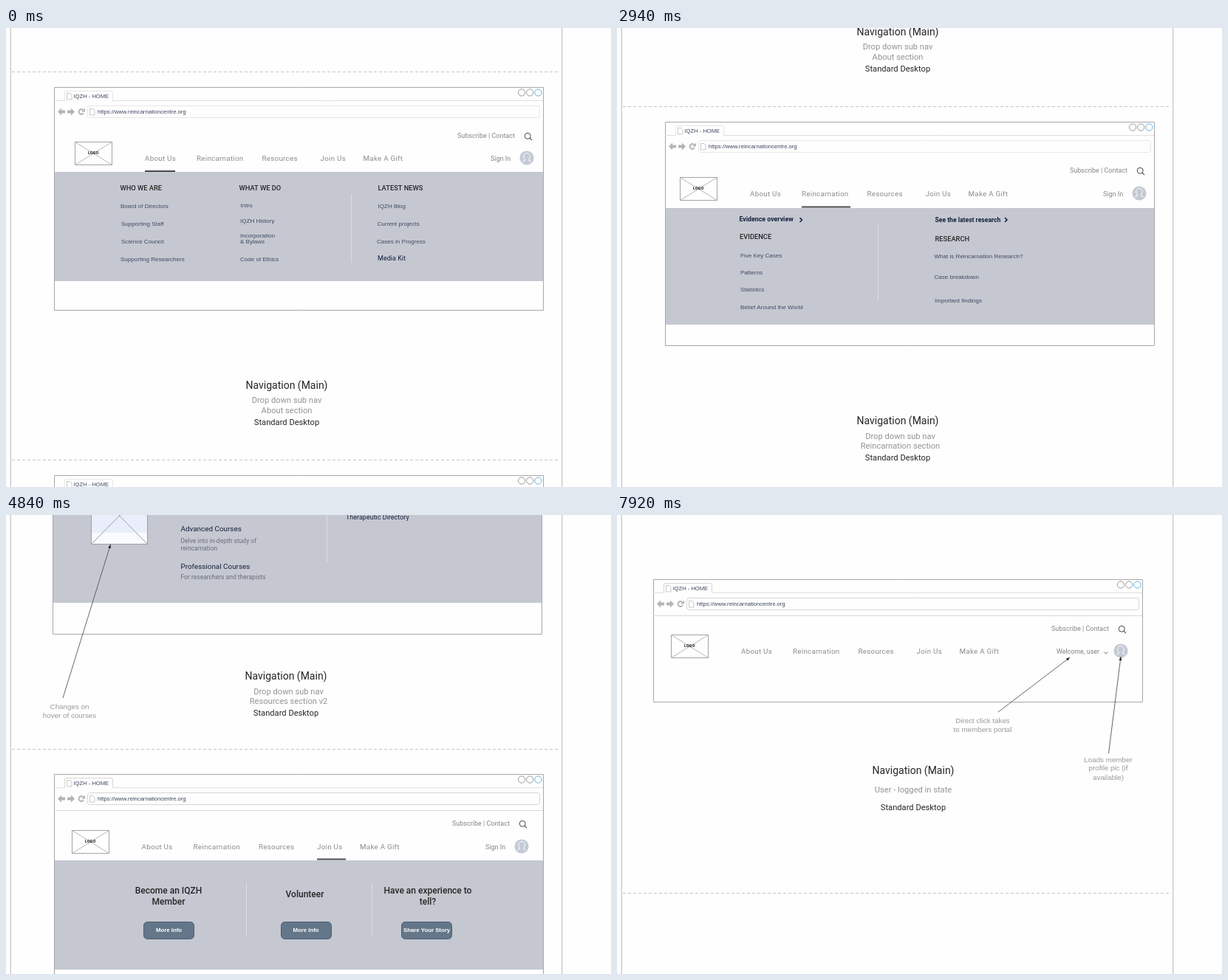
Write an HTML page with a canvas that moves like this. It is 819 px wide and 622 px high and loops after 7.99 s.

```html
<!DOCTYPE html>
<html lang="en">
<head>
<meta charset="utf-8">
<title>Navigation wireframes</title>
<style>
  html, body { margin: 0; width: 100%; height: 100%; overflow: hidden; background: #fefefe; }
  canvas { display: block; }
</style>
</head>
<body>
<canvas id="stage" width="819" height="622"></canvas>
<script>
const ctx = document.getElementById('stage').getContext('2d');
const W = 819, H = 622, LOOP = 7990;
const ROBOTO = 'Roboto, sans-serif', ARIAL = '"Liberation Sans", Arial, sans-serif';
const INK = '#262626', GREY = '#8c8c8c', SLATE = '#3f4a63', NAVY = '#14203c', BAND = '#c5c8d1';

// Key-press scrolling: [first visible step, end, scroll position reached]
const MOVES = [
  [1240, 1410, 40], [1790, 2080, 240], [2260, 2410, 280], [2720, 3370, 880],
  [3620, 3770, 920], [4080, 4510, 1280], [4760, 4840, 1320], [5240, 5706, 1720],
  [5870, 6010, 1760], [6338, 6972, 2320], [7060, 7180, 2360], [7560, 8246, 2960]
];
const STEP = 72, LEAD = 45;

// Distance share for a speed that ramps up, holds and ramps down
function glide(t, total) {
  const ramp = Math.min(180, total / 2), v = 1 / (total - ramp);
  if (t < ramp) return v * t * t / (2 * ramp);
  if (t > total - ramp) return 1 - v * (total - t) ** 2 / (2 * ramp);
  return v * (t - ramp / 2);
}

function scrollAt(t) {
  let pos = 0;
  for (const [first, end, to] of MOVES) {
    if (t < first) break;
    if (t >= end) { pos = to; continue; }
    const held = Math.floor((t - first + 0.5) / STEP) * STEP;
    pos += (to - pos) * glide(held + LEAD, end - first + LEAD);
    break;
  }
  return Math.round(pos);
}

// Text is placed by the vertical middle of its capitals
function text(s, x, y, size, color, { family = ROBOTO, weight = 400, align = 'left', gap = 0 } = {}) {
  ctx.font = `${weight} ${size}px ${family}`;
  ctx.letterSpacing = gap + 'px';
  ctx.textAlign = align;
  ctx.fillStyle = color;
  ctx.fillText(s, x, Math.round(y + size * 0.355));
}

function line(color, width, ...pts) {
  ctx.strokeStyle = color;
  ctx.lineWidth = width;
  ctx.beginPath();
  for (let i = 0; i < pts.length; i += 2) ctx.lineTo(pts[i], pts[i + 1]);
  ctx.stroke();
}

function box(x, y, w, h, stroke, fill, r = 0) {
  ctx.beginPath();
  ctx.roundRect(x + 0.5, y + 0.5, w, h, r);
  if (fill) { ctx.fillStyle = fill; ctx.fill(); }
  if (stroke) { ctx.strokeStyle = stroke; ctx.lineWidth = 1; ctx.stroke(); }
}

function shape(fill, ...pts) {
  ctx.fillStyle = fill;
  ctx.beginPath();
  for (let i = 0; i < pts.length; i += 2) ctx.lineTo(pts[i], pts[i + 1]);
  ctx.fill();
}

function ring(x, y, r, color, width = 1, from = 0, to = Math.PI * 2) {
  ctx.strokeStyle = color;
  ctx.lineWidth = width;
  ctx.beginPath();
  ctx.arc(x, y, r, from, to);
  ctx.stroke();
}

function arrow(x1, y1, x2, y2) {
  line('#555', 0.9, x1, y1, x2, y2);
  const a = Math.atan2(y2 - y1, x2 - x1), c = Math.cos(a) * 5, s = Math.sin(a) * 5;
  shape('#222', x2, y2, x2 - c - s * 0.4, y2 - s + c * 0.4, x2 - c + s * 0.4, y2 - s - c * 0.4);
}

const chevron = (x, y) => line(NAVY, 1.5, x - 1.5, y - 3, x + 1.5, y, x - 1.5, y + 3);
const divider = (x, y1, y2) => line('#dadce2', 1, x + 0.5, y1, x + 0.5, y2);
const heads = list => list.forEach(([s, x, y]) => text(s, x, y, 9.3, INK, { weight: 500 }));
const links = list => list.forEach(([s, x, y]) => text(s, x, y, 8.05, SLATE, { family: ARIAL }));
const notes = list => list.forEach(([s, x, y]) =>
  text(s, x, y, 9.8, '#999', { family: ARIAL, align: 'center' }));

function page(x, y) {
  line('#c9c9c9', 1, x + 0.5, y + 0.5, x + 5, y + 0.5, x + 7, y + 3, x + 7, y + 9, x + 0.5, y + 9, x + 0.5, y);
}

function chrome(x, y, faint) {
  const edge = faint ? '#e6e6e6' : '#d6d6d6';
  line('#e0e0e0', 1, x, y + 18.5, x + 15, y + 18.5);
  line('#e0e0e0', 1, x + 79, y + 18.5, x + 662, y + 18.5);
  ctx.strokeStyle = edge;
  ctx.beginPath();
  ctx.moveTo(x + 14.5, y + 18.5);
  ctx.lineTo(x + 14.5, y + 7);
  ctx.quadraticCurveTo(x + 14.5, y + 5.5, x + 17, y + 5.5);
  ctx.lineTo(x + 77, y + 5.5);
  ctx.quadraticCurveTo(x + 79.5, y + 5.5, x + 79.5, y + 8);
  ctx.lineTo(x + 79.5, y + 18.5);
  ctx.stroke();
  page(x + 17, y + 8);
  text('IQZH - HOME', x + 26.5, y + 12, 7.6, SLATE, { family: ARIAL });
  ['#999', '#999', '#5fb2e6'].forEach((c, i) => ring(x + 633 + i * 11.2, y + 7.5, 4.6, c));

  const m = y + 33.5, g = '#b4b4b4';
  shape(g, x + 5, m, x + 10, m - 5, x + 10, m - 2, x + 15, m - 2, x + 15, m + 2, x + 10, m + 2, x + 10, m + 5);
  shape(g, x + 28, m, x + 23, m - 5, x + 23, m - 2, x + 18, m - 2, x + 18, m + 2, x + 23, m + 2, x + 23, m + 5);
  ring(x + 37, m, 3.4, g, 2, 0.5, 5.4);
  shape(g, x + 42, m - 5, x + 42, m, x + 37, m);
  box(x + 45, y + 25, 612, 16, edge, null, 3);
  page(x + 48, y + 29);
  text('https://www.reincarnationcentre.org', x + 59, m, 7.63, '#3c4660', { family: ARIAL });
  if (!faint) line('#dadada', 1, x, y + 49.5, x + 662, y + 49.5);
}

function avatar(x, y) {
  ctx.fillStyle = '#c4cad5';
  ctx.beginPath();
  ctx.arc(x, y, 9.6, 0, 7);
  ctx.fill();
  ctx.strokeStyle = '#fff';
  ctx.lineWidth = 1;
  ctx.beginPath();
  ctx.moveTo(x - 6, y + 5.5);
  ctx.quadraticCurveTo(x - 5.5, y + 4, x - 2, y + 3);
  ctx.bezierCurveTo(x - 6, y - 2, x - 4, y - 6.5, x, y - 6.5);
  ctx.bezierCurveTo(x + 4, y - 6.5, x + 6, y - 2, x + 2, y + 3);
  ctx.quadraticCurveTo(x + 5.5, y + 4, x + 6, y + 5.5);
  ctx.stroke();
}

const NAV = [['About Us', 0], ['Reincarnation', 70], ['Resources', 158.5], ['Join Us', 237.5], ['Make A Gift', 295.5]];

// nx, ny: start of the menu; sx, sy: start of the utility links
function panel({ x, y, h, nx, ny, sx, sy, band, mark, faint, user }) {
  box(x, y, 662, h, '#a8a8a8', '#fefefe');
  chrome(x, y, faint);

  const lx = Math.round(nx - 95), ly = Math.round(ny - 22.5);
  box(lx, ly, 50, 31, '#a4a4a4', '#fefefe');
  line('#a4a4a4', 0.8, lx + 0.5, ly + 0.5, lx + 50.5, ly + 31.5);
  line('#a4a4a4', 0.8, lx + 50.5, ly + 0.5, lx + 0.5, ly + 31.5);
  text('LOGO', lx + 25.3, ly + 15.5, 5.2, '#111', { weight: 700, align: 'center', gap: 0.3 });

  NAV.forEach(([s, dx]) => text(s, nx + dx, ny, 9.8, GREY, { gap: 0.26 }));
  text('Subscribe | Contact', sx, sy, 9, '#858585');
  ring(sx + 95.2, sy + 0.3, 4, '#444');
  line('#444', 1.1, sx + 98, sy + 3.1, sx + 101, sy + 6.1);
  if (user) {
    text('Welcome, user', sx + 7, ny + 0.5, 8.9, '#808080');
    line('#777', 1, sx + 71.5, ny + 1, sx + 74, ny + 3.5, sx + 76.5, ny + 1);
  } else {
    text('Sign In', sx + 45, ny + 0.5, 9, '#858585');
  }
  avatar(sx + 94, ny - 0.5);

  if (band) {
    ctx.fillStyle = BAND;
    ctx.fillRect(x + 1, band[0], 661, band[1] - band[0]);
  }
  if (mark) line('#4a4a4a', 2, mark[0], mark[2], mark[1], mark[2]);
}

function caption(cx, y, subs, lastY, dx = 0) {
  const align = 'center';
  text('Navigation (Main)', cx, y, 14, INK, { align });
  subs.forEach(([s, sy]) => text(s, cx + dx, sy, 11.15, '#939393', { align }));
  text('Standard Desktop', cx, lastY, 11.15, INK, { align });
}

function about() {
  panel({ x: 65, y: 80, h: 302, nx: 188, ny: 176.5, sx: 611, sy: 146, band: [195, 343], mark: [188, 229, 194], faint: true });
  heads([['WHO WE ARE', 154.5, 217], ['WHAT WE DO', 315.5, 217], ['LATEST NEWS', 503.5, 217]]);
  links([
    ['Board of Directors', 155, 241], ['Supporting Staff', 156, 265],
    ['Science Council', 156, 289], ['Supporting Researchers', 155, 313],
    ['Intro', 317.5, 240], ['IQZH History', 317, 261], ['Incorporation', 317, 281],
    ['& Bylaws', 317, 289], ['Code of Ethics', 317, 313],
    ['IQZH Blog', 503.5, 241], ['Current projects', 502.5, 265], ['Cases in Progress', 502, 289]
  ]);
  text('Media Kit', 503, 312, 9.05, NAVY);
  divider(467, 225, 318);
  caption(380, 484, [['Drop down sub nav', 504], ['About section', 518]], 534);
}

function reincarnation() {
  panel({ x: 65, y: 366, h: 303, nx: 180, ny: 463.5, sx: 613, sy: 432, band: [483, 641], mark: [250, 316, 481.5], faint: true });
  text('Evidence overview', 165.5, 498, 8.8, NAVY, { weight: 700 });
  text('See the latest research', 430.5, 499, 8.6, NAVY, { weight: 700 });
  chevron(249, 499);
  chevron(526.5, 499);
  heads([['EVIDENCE', 166, 522], ['RESEARCH', 430.5, 525]]);
  links([
    ['Five Key Cases', 167, 547], ['Patterns', 167, 570], ['Statistics', 167, 593],
    ['Belief Around the World', 167, 617], ['What is Reincarnation Research?', 429.5, 548],
    ['Case breakdown', 429.5, 576], ['Important findings', 430, 608]
  ]);
  divider(353, 506, 608);
  caption(380, 771, [['Drop down sub nav', 792], ['Reincarnation section', 805]], 821, 3.5);
}

function resources() {
  panel({ x: 63, y: 256, h: 345, nx: 179, ny: 351, sx: 608.5, sy: 322, band: [369, 559], mark: [335, 390, 368.5] });
  box(115, 402, 76, 77, '#9a9fa8', '#e9eefa');
  ctx.fillStyle = '#f8fafd';
  ctx.fillRect(116, 464, 75, 15);
  line('#9a9fa8', 1, 115.5, 402.5, 191.5, 479.5);
  line('#9a9fa8', 1, 191.5, 402.5, 115.5, 479.5);
  heads([['COURSES OVERVIEW', 235, 390], ['LIBRARY', 461.5, 390]]);
  [['Short Courses', 235, 420], ['Advanced Courses', 236.5, 458], ['Professional Courses', 236.5, 509]]
    .forEach(([s, x, y]) => text(s, x, y, 9.9, NAVY));
  [['Jump right into the research', 234.5, 435], ['Delve into in-depth study of', 236.5, 475],
   ['reincarnation', 236.5, 485], ['For researchers and therapists', 236.5, 524]]
    .forEach(([s, x, y]) => text(s, x, y, 8.5, '#6a6e7a'));
  text('Afterpath Source Almanac', 460, 416, 9, NAVY);
  text('Therapeutic Directory', 460, 443, 9, NAVY);
  divider(434, 402, 504);
  arrow(77, 688, 141.5, 480);
  notes([['Changes on', 86, 700], ['hover of courses', 86, 712]]);
  caption(379, 658, [['Drop down sub nav', 679], ['Resources section v2', 692]], 708, 3.5);
}

function button(s, x, cx) {
  box(x, 551, 68, 23, '#4c5d70', '#64768a', 5);
  text(s, cx, 562, 7.8, '#fff', { family: ARIAL, weight: 700, align: 'center' });
}

function join() {
  panel({ x: 65, y: 351, h: 346, nx: 183.5, ny: 449.5, sx: 604, sy: 418, band: [468, 616], mark: [421, 460, 466.5] });
  [['Become an IQZH', 220, 509], ['Member', 220, 524], ['Volunteer', 404.5, 514],
   ['Have an experience to', 571, 509], ['tell?', 571, 524]]
    .forEach(([s, x, y]) => text(s, x, y, 12, INK, { weight: 500, align: 'center' }));
  divider(325, 498, 571);
  divider(495, 500, 572);
  button('More Info', 186, 220.5);
  button('More Info', 372, 406);
  button('Share Your Story', 535, 569.5);
  caption(383.5, 757, [['Drop down sub nav', 777], ['Join Us section', 791]], 807, 3.5);
}

function gift() {
  panel({ x: 53, y: 105, h: 167, nx: 172, ny: 203.5, sx: 592, sy: 172 });
  line('#7679a2', 2.4, 517, 188, 461, 188, 461, 216, 524, 216, 524, 188);
  arrow(594, 381, 524.5, 216);
  notes([['Border transition', 624, 388.5], ['on hover to full', 624, 401], ['rectangle', 624, 413]]);
  caption(405, 365, [['Make a Gift', 383], ['(border transition)', 397]], 415);
}

function member() {
  panel({ x: 49, y: 87, h: 166, nx: 168, ny: 184.5, sx: 588, sy: 154, user: true });
  arrow(516, 267, 613, 193);
  arrow(665.5, 323, 682, 192);
  notes([
    ['Direct click takes', 495, 279], ['to members portal', 495, 291],
    ['Loads member', 665, 331.5], ['profile pic (if', 665, 343], ['available)', 665, 356]
  ]);
  caption(401, 346, [['User - logged in state', 372]], 396);
}

const SECTIONS = [[0, about], [240, reincarnation], [880, resources], [1320, join], [2194, gift], [2703, member]];

function draw(scroll) {
  ctx.fillStyle = '#fefefe';
  ctx.fillRect(0, 0, W, H);
  line('#cbcbcb', 1.4, 6.3, 0, 6.3, H);
  line('#cbcbcb', 1.4, 752.7, 0, 752.7, H);
  ctx.setLineDash([4, 3]);
  for (let y = 59; y < 3300; y += 526) line('#c6c6c6', 1, 8, y - scroll + 0.5, 750, y - scroll + 0.5);
  ctx.setLineDash([]);
  for (const [top, paint] of SECTIONS) {
    ctx.save();
    ctx.translate(0, top - scroll);
    paint();
    ctx.restore();
  }
}

let shown = -1;
function tick() {
  const scroll = scrollAt(performance.now() % LOOP);
  if (scroll !== shown) draw(shown = scroll);
  requestAnimationFrame(tick);
}
tick();
</script>
</body>
</html>
```
